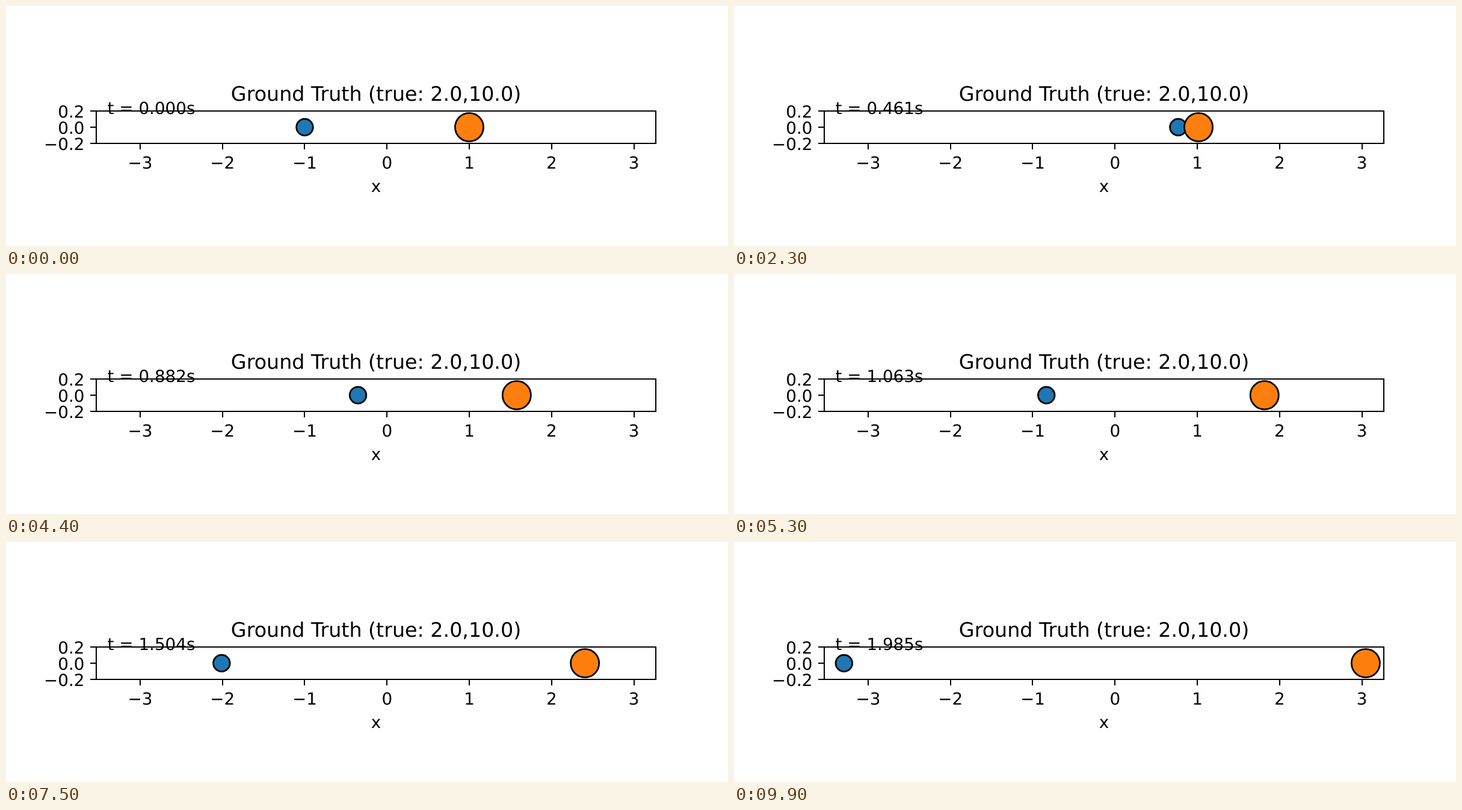
An HTML page that plays this animation: 1200 px wide and 400 px high, repeating every 10000 ms.

```html
<!DOCTYPE html>
<html lang="en">
<head>
<meta charset="utf-8">
<title>Two-body collision</title>
<style>
  html, body { margin: 0; width: 100%; height: 100%; overflow: hidden; background: #fff; }
  svg { display: block; width: 1200px; height: 400px; }
  text { font: 27.78px "DejaVu Sans", sans-serif; text-rendering: geometricPrecision; white-space: pre; }
  .mid { text-anchor: middle; }
  .end { text-anchor: end; }
  .title { font-size: 33.33px; }
  .line { fill: none; stroke: #000; stroke-width: 2; }
  circle { stroke: #000; stroke-width: 2.78; }
</style>
</head>
<body>
<svg viewBox="0 0 1200 400">
  <circle id="light" cy="202" fill="#1f77b4"/>
  <circle id="heavy" cy="202" fill="#ff7f0e"/>
  <path id="axes" class="line"/>
  <g id="labels"></g>
  <text class="mid title" x="615" y="158">Ground Truth (true: 2.0,10.0)</text>
  <text class="mid" x="615" y="310">x</text>
  <text id="clock" x="168.6" y="180"></text>
</svg>
<script>
const $ = id => document.getElementById(id);
const SCALE = 930 / 6.8;                       // pixels per unit
const px = x => 150 + (x + 3.53333) * SCALE;

// Axes, ticks and tick labels
let path = 'M150 175H1080V229H150Z', labels = '';
for (let i = -3; i <= 3; i++) {
  const x = px(i);
  path += `M${Math.round(x)} 229v10`;
  labels += `<text class="mid" x="${x}" y="271">${String(i).replace('-', '−')}</text>`;
}
['0.2', '0.0', '−0.2'].forEach((label, i) => {
  const y = 175 + 27 * i;
  path += `M150 ${y}h-10`;
  labels += `<text class="end" x="130.5" y="${y + 11}">${label}</text>`;
});
$('axes').setAttribute('d', path);
$('labels').innerHTML = labels;

// Elastic collision through a stiff contact spring
const M1 = 2, M2 = 10, M = M1 + M2, SPEED = 4;
const radius = m => 0.08 * Math.cbrt(m);
const reach = radius(M1) + radius(M2);
const omega = 2 * Math.PI / (reach - 0.2);
const touch = (2 - reach) / SPEED, contact = Math.PI / omega;

function gap(t) {
  const s = t - touch;
  if (s < 0) return reach - SPEED * s;
  if (s < contact) return reach - SPEED / omega * Math.sin(omega * s);
  return reach + SPEED * (s - contact);
}

$('light').setAttribute('r', radius(M1) * SCALE);
$('heavy').setAttribute('r', radius(M2) * SCALE);

function draw(now) {
  const step = Math.floor(now % 10000 / 100);
  const t = step * 8 / 399;
  const center = (M1 * (-1 + SPEED * t) + M2) / M;
  const d = gap(t);
  $('light').setAttribute('cx', px(center - d * M2 / M));
  $('heavy').setAttribute('cx', px(center + d * M1 / M));
  $('clock').textContent = `t = ${t.toFixed(3)}s`;
}

function tick() {
  draw(performance.now());
  requestAnimationFrame(tick);
}
tick();
</script>
</body>
</html>
```
